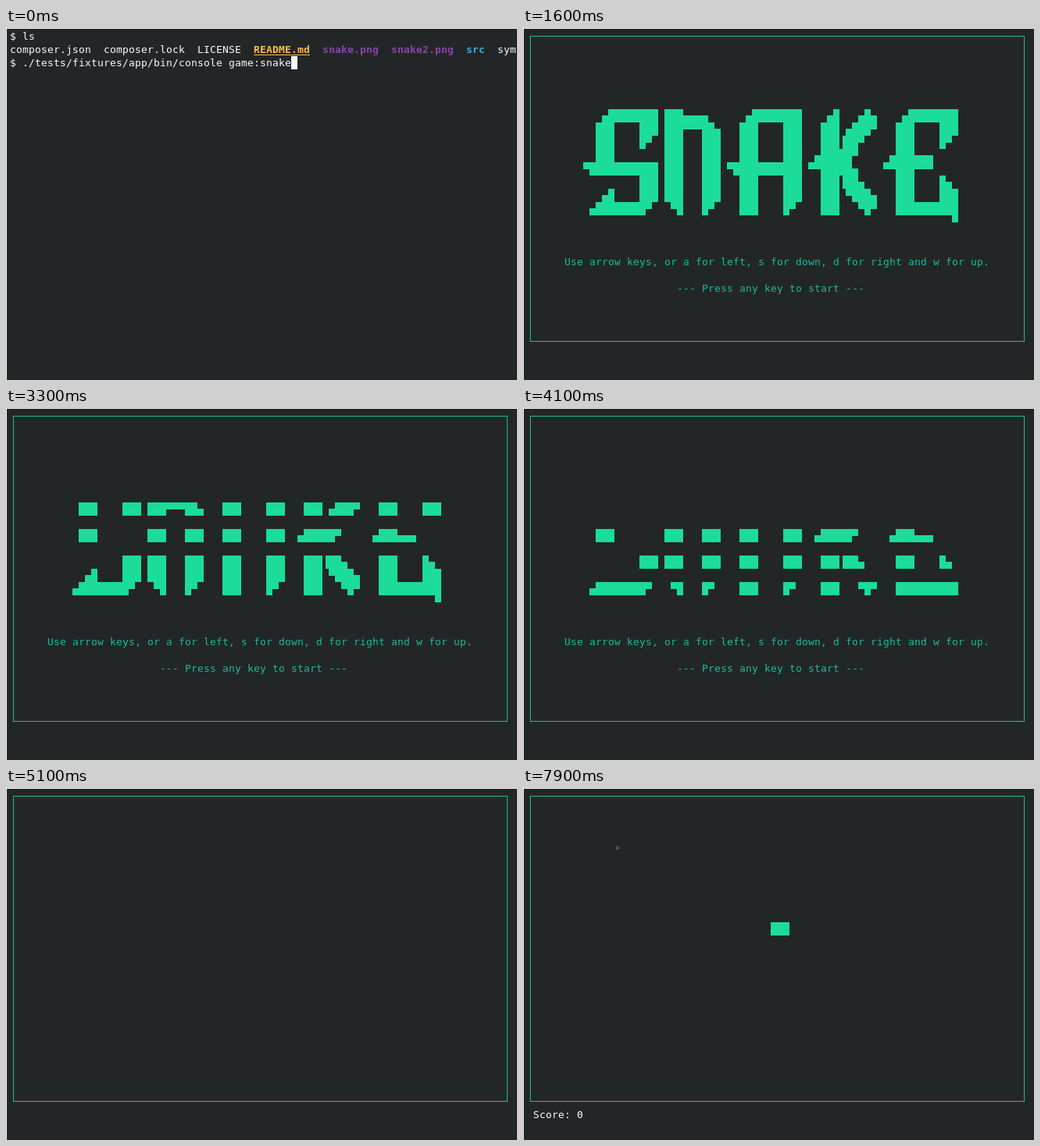
These frames come from a looping animation (654 by 451 pixels, 8 s). An HTML page with a canvas:

```html
<!DOCTYPE html>
<html lang="en">
<head>
<meta charset="utf-8">
<title>Terminal snake</title>
<style>
  html, body { margin: 0; width: 100%; height: 100%; overflow: hidden; background: #232627; }
  canvas { display: block; }
</style>
</head>
<body>
<canvas id="stage" width="654" height="451"></canvas>
<script>
const ctx = document.getElementById('stage').getContext('2d');
const LOOP = 8000;
const CELL_W = 8, CELL_H = 17;
const COLOR = {
  back: '#232627', white: '#fcfcfc', cyan: '#1abc9c', green: '#1cdc9a', dull: '#5fa094',
  yellow: '#fdbc4b', purple: '#8e44ad', blue: '#3daee9', food: '#9b59b6'
};

const BANNER_COL = 9, BANNER_ROW = 6;
const BANNER = [
  '   ▄████████ ███▄▄▄▄      ▄████████    ▄█   ▄█▄    ▄████████',
  '  ███    ███ ███▀▀▀██▄   ███    ███   ███ ▄███▀   ███    ███',
  '  ███    █▀  ███   ███   ███    ███   ███▐██▀     ███    █▀',
  '  ███        ███   ███   ███    ███  ▄█████▀     ▄███▄▄▄',
  '▀███████████ ███   ███ ▀███████████ ▀▀█████▄    ▀▀███▀▀▀',
  '         ███ ███   ███   ███    ███   ███▐██▄     ███    █▄',
  '   ▄█    ███ ███   ███   ███    ███   ███ ▀███▄   ███    ███',
  ' ▄████████▀   ▀█   █▀    ███    █▀    ███   ▀█▀   ██████████',
  ' '.repeat(59) + '▀'
];

// Block characters as [x, y, width, height] inside a cell
const BLOCKS = {
  '█': [0, 0, 8, 17],
  '▀': [0, 0, 8, 9],
  '▄': [0, 8, 8, 9],
  '▐': [4, 0, 4, 17]
};

// Cells visited by the snake's head: right, up, then left
const TRAIL = [
  [40, 12], [41, 12], [42, 12], [43, 12], [43, 11],
  [43, 10], [42, 10], [41, 10], [40, 10], [39, 10]
];

const cellX = col => 5 + col * CELL_W;
const cellY = row => 2 + row * CELL_H;

function rect(x, y, w, h, color) {
  ctx.fillStyle = color;
  ctx.fillRect(x, y, w, h);
}

function block(char, col, row, color) {
  const [x, y, w, h] = BLOCKS[char];
  rect(cellX(col) + x, cellY(row) + y, w, h, color);
}

// Prints one character per cell and returns the column after the text
function print(text, col, row, color = COLOR.white, weight = 'normal') {
  ctx.font = `${weight} 13px "DejaVu Sans Mono", monospace`;
  ctx.fillStyle = color;
  for (const char of text) ctx.fillText(char, cellX(col++), cellY(row) + 13);
  return col;
}

function drawShell(entered) {
  print('$ ls', 0, 0);
  print('composer.json  composer.lock  LICENSE', 0, 1);
  print('README.md', 39, 1, COLOR.yellow, 'bold');
  rect(cellX(39), 34, 9 * CELL_W, 1, COLOR.yellow);
  print('snake.png', 50, 1, COLOR.purple, 'bold');
  print('snake2.png', 61, 1, COLOR.purple, 'bold');
  print('src', 73, 1, COLOR.blue, 'bold');
  print('sym', 78, 1);
  const end = print('$ ./tests/fixtures/app/bin/console game:snake', 0, 2);
  if (entered) block('█', 0, 3, COLOR.white);
  else block('█', end, 2, COLOR.white);
}

function drawBorder() {
  rect(9, 401, 633, 1, COLOR.dull);
  rect(9, 10, 1, 391, COLOR.cyan);
  rect(641, 10, 1, 391, COLOR.cyan);
  rect(9, 10, 633, 1, COLOR.cyan);
}

function drawTitle(t) {
  BANNER.forEach((line, i) => {
    // Even lines are wiped first, then the odd ones
    const wipedAt = (i % 2 ? 4000 : 2900) + 100 * i;
    if (t >= wipedAt) return;
    [...line].forEach((char, col) => {
      if (char !== ' ') block(char, BANNER_COL + col, BANNER_ROW + i, COLOR.green);
    });
  });
  print('Use arrow keys, or a for left, s for down, d for right and w for up.', 6, 17, COLOR.cyan);
  print('--- Press any key to start ---', 24, 19, COLOR.cyan);
}

function drawGame(t) {
  const head = Math.floor((t - 6100) / 200);
  for (const [col, row] of TRAIL.slice(Math.max(0, head - 2), head + 1)) {
    block('█', col, row, COLOR.green);
  }
  print('*', 14, 4, COLOR.food);
  print('Score: 0', 1, 24);
}

function draw(t) {
  rect(0, 0, 654, 451, COLOR.back);
  rect(0, 0, 654, 1, COLOR.white);
  rect(0, 0, 1, 451, COLOR.white);
  if (t < 1600) return drawShell(t >= 1500);
  drawBorder();
  if (t < 5100) drawTitle(t);
  else if (t >= 6100) drawGame(t);
}

const startTime = performance.now();
function frame() {
  draw((performance.now() - startTime) % LOOP);
  requestAnimationFrame(frame);
}
frame();
</script>
</body>
</html>
```
